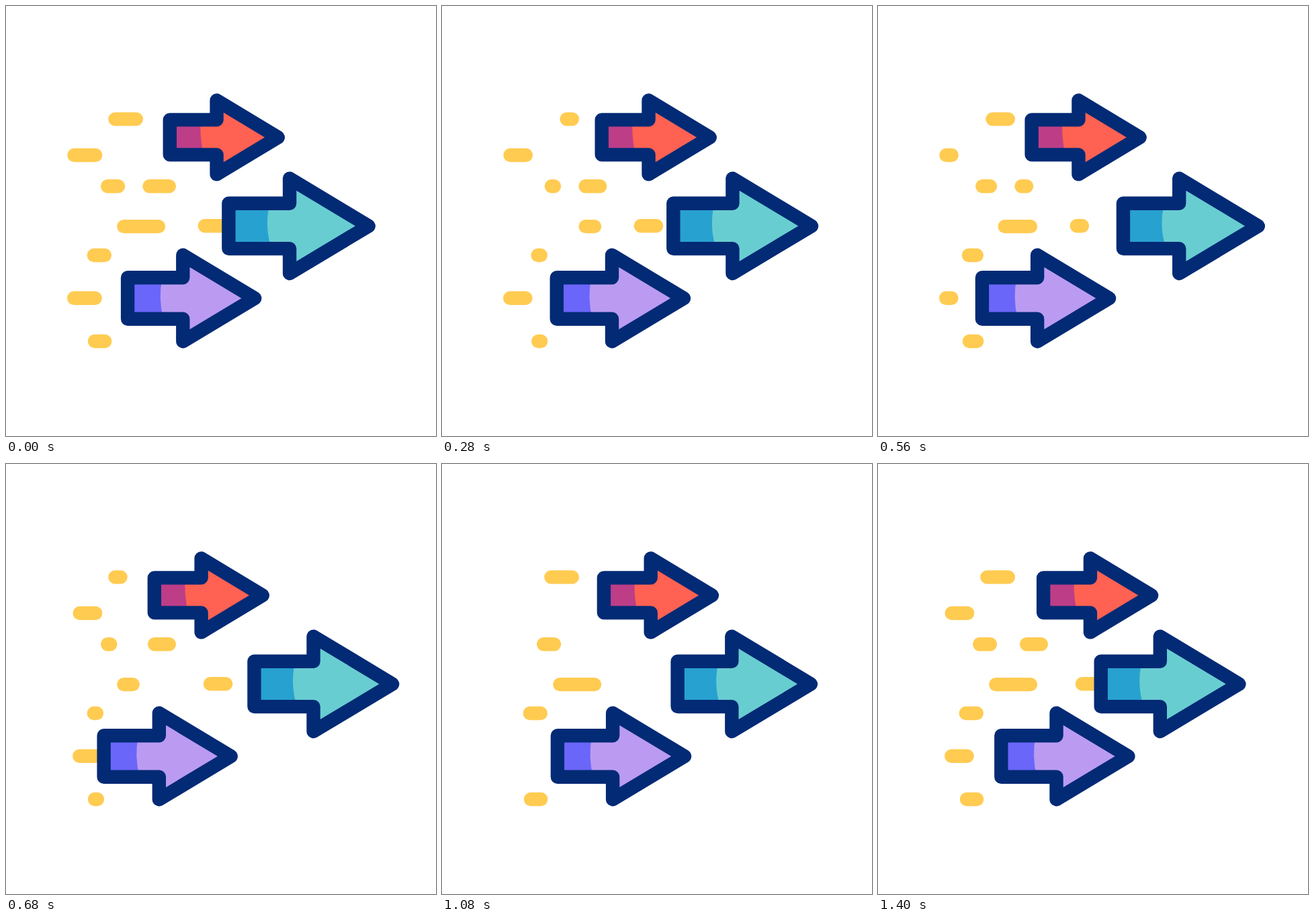
Animation of 640x640 px, one loop 1.44 s. Source, as an HTML page:

```html
<!DOCTYPE html>
<html lang="en">
<head>
<meta charset="utf-8">
<title>Racing arrows</title>
<style>
  html, body { margin: 0; width: 100%; height: 100%; overflow: hidden; background: #fff; }
  svg { display: block; width: 100vw; height: 100vh; }
  .dash { fill: none; stroke: #ffcb51; stroke-width: 20.4; stroke-linecap: round; }
  .line { fill: none; stroke: #032a75; stroke-width: 20.4; stroke-linejoin: round; }
</style>
</head>
<body>
<svg id="stage" viewBox="0 0 640 640"></svg>
<script>
const LOOP = 1440, STEP = 40, BEAT = 240, HALF = BEAT / 2, KICK = 10;
const stage = document.getElementById('stage');

function add(name, attrs) {
  const el = document.createElementNS('http://www.w3.org/2000/svg', name);
  for (const key in attrs) el.setAttribute(key, attrs[key]);
  return stage.appendChild(el);
}

const smooth = u => u * u * (3 - 2 * u);
const clamp = (v, lo, hi) => Math.min(hi, Math.max(lo, v));
// 0 -> 1 -> 0 over one period
const swing = (t, period) => {
  const u = (t % period) / period * 2;
  return smooth(u < 1 ? u : 2 - u);
};

// Centre-line ends of each streak; late ones rest at both ends of the loop
const dashes = [
  { y: 168.4, a: 162.4, b: 193.8, late: true },
  { y: 268.3, a: 151.2, b: 167, late: true },
  { y: 328.1, a: 175.3, b: 227, late: true },
  { y: 371, a: 130.8, b: 146.8, late: true },
  { y: 499, a: 132, b: 147.2, late: true },
  { y: 222, a: 101.5, b: 133.2 },
  { y: 268.3, a: 213.5, b: 242.8 },
  { y: 327.2, a: 295.8, b: 327.2 },
  { y: 434.7, a: 101.2, b: 132.6 }
];

// drift: slow travel, kick: quick recoil, split: tail ignores the recoil
const arrows = [
  { tail: 243.8, neck: 313.6, tip: 404.8, y: 195.4, shaft: 26, head: 55,
    seam: [289.7, 288, 294], fill: '#ff6152', shade: '#bd3d87', drift: -25.8, kick: KICK },
  { tail: 331.4, neck: 422.1, tip: 539.7, y: 327.4, shaft: 33.7, head: 70.7,
    seam: [392.5, 384.3, 395], fill: '#68cdd1', shade: '#27a1cf', drift: 38.4, kick: -KICK, split: true },
  { tail: 181.1, neck: 263.3, tip: 370.2, y: 435, shaft: 30.7, head: 64.2,
    seam: [232.5, 226.4, 234], fill: '#bb9bf2', shade: '#6a66f9', drift: -38.4, kick: KICK }
];

for (const d of dashes) d.el = add('path', { class: 'dash' });
for (const a of arrows) {
  a.body = add('path', { fill: a.fill });
  a.dark = add('path', { fill: a.shade });
  a.line = add('path', { class: 'line' });
}

function drawDash(d, t) {
  const u = (d.late ? clamp(t - HALF, 0, LOOP - BEAT) : t) % BEAT / HALF;
  const len = d.b - d.a;
  // leave towards the left, then grow back from the right
  const from = u < 1 ? d.a : d.b - len * smooth(u - 1);
  const to = u < 1 ? d.b - len * smooth(u) : d.b;
  d.el.setAttribute('display', to - from < 0.01 ? 'none' : 'inline');
  d.el.setAttribute('d', `M${from} ${d.y}H${to}`);
}

function drawArrow(a, t) {
  const base = a.drift * swing(t, LOOP);
  const front = base + a.kick * swing(t, BEAT);
  const back = a.split ? base : front;
  const tail = a.tail + back, neck = a.neck + front, tip = a.tip + front;
  const top = a.y - a.shaft, low = a.y + a.shaft;
  const shape = `M${tail} ${top}H${neck}V${a.y - a.head}L${tip} ${a.y}` +
    `L${neck} ${a.y + a.head}V${low}H${tail}Z`;
  const [s0, s1, s2] = a.seam.map(x => x + back);
  a.body.setAttribute('d', shape);
  a.line.setAttribute('d', shape);
  a.dark.setAttribute('d', `M${tail} ${top}H${s0}Q${s1} ${a.y} ${s2} ${low}H${tail}Z`);
}

function draw(now) {
  const t = Math.floor(now % LOOP / STEP) * STEP;
  dashes.forEach(d => drawDash(d, t));
  arrows.forEach(a => drawArrow(a, t));
}

function tick() {
  draw(performance.now());
  requestAnimationFrame(tick);
}
tick();
</script>
</body>
</html>
```
